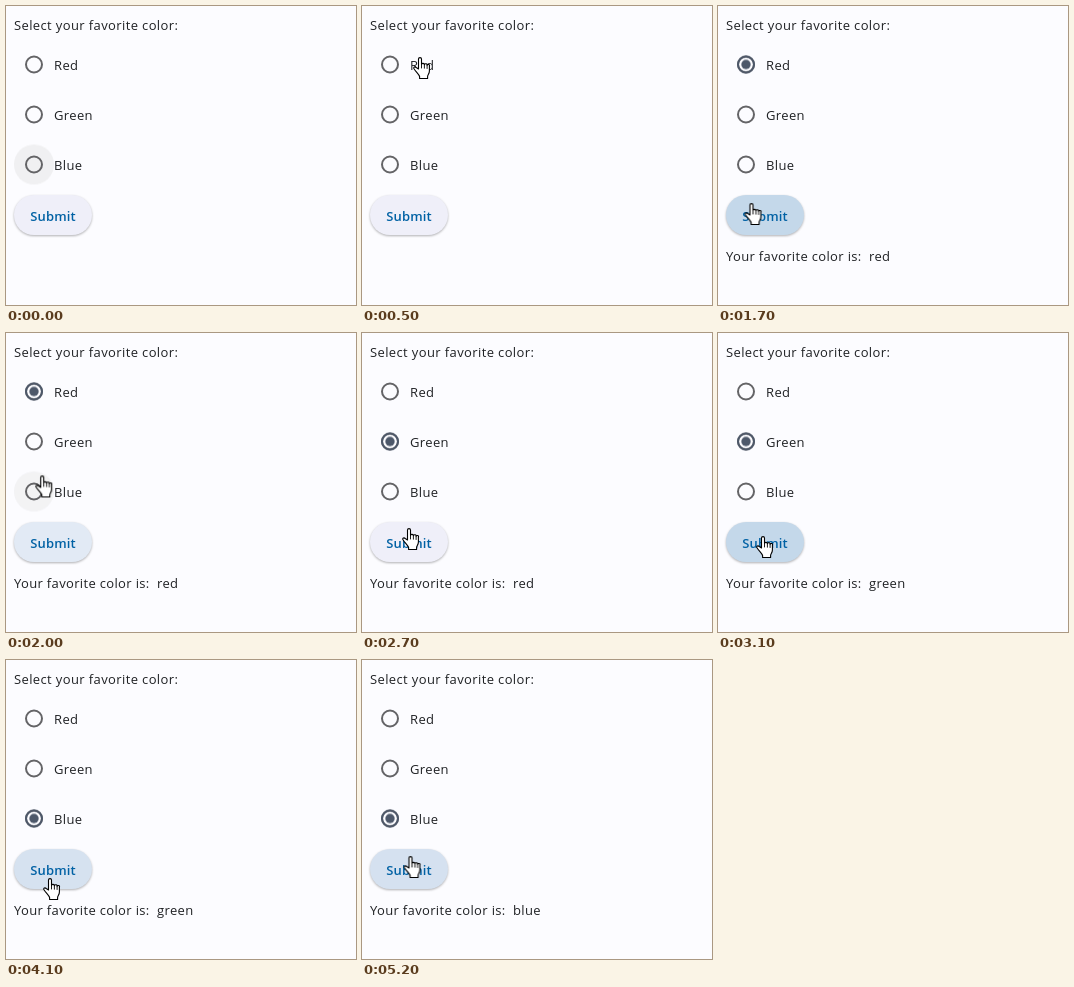
An HTML page for the animation above (5400 ms loop, 350x299 px).

```html
<!DOCTYPE html>
<html lang="en">
<head>
<meta charset="utf-8">
<title>Favorite color</title>
<style>
html, body { margin: 0; width: 100%; height: 100%; overflow: hidden; background: #fcfcff; }
svg { display: block; width: 100%; height: 100%; }
text { font: 13px "Open Sans", "Noto Sans", sans-serif; letter-spacing: .38px; fill: #1f2124; }

.ring { fill: none; stroke: #646467; stroke-width: 2; }
.on .ring { stroke: #4d586a; }
.on .dot { fill: #4d586a; }
.halo { fill: #f0f0f2; }

.face { fill: #efeff9; filter: drop-shadow(0 1px 1.3px rgba(0, 0, 0, .3)); }
.submit { font-weight: 600; letter-spacing: .12px; text-anchor: middle; fill: #0061a4; }
.label { letter-spacing: .34px; }

.hand path { fill: #fff; stroke: #000; stroke-width: 1.1; stroke-linejoin: round; stroke-linecap: round; }
.hand .gaps { fill: none; stroke-width: .9; }
.arrow { fill: #0a0a0a; stroke: #fff; stroke-width: .7; }

/* Everything shares one 5.4 s loop, advancing in 0.1 s ticks. */
.anim { animation: 5.4s step-end infinite; }
.red.on { animation-name: red-on; }
.green.on { animation-name: green-on; }
.blue.on { animation-name: blue-on; }
.green.halo { animation-name: green-halo; }
.blue.halo { animation-name: blue-halo; }
.face { animation-name: face; }
.label { animation-name: label; }
.red.value { animation-name: red-value; }
.green.value { animation-name: green-value; }
.blue.value { animation-name: blue-value; }
.cursor { animation-name: move; }
.hand { animation-name: hand; }
.arrow { animation-name: arrow; }

@keyframes red-on {
  0% { opacity: 0 } 12.96% { opacity: .5 } 14.81% { opacity: 1 }
  44.44% { opacity: .5 } 46.29%, 100% { opacity: 0 }
}
@keyframes green-on {
  0% { opacity: 0 } 44.44% { opacity: .5 } 46.29% { opacity: 1 }
  70.37% { opacity: .5 } 72.22%, 100% { opacity: 0 }
}
@keyframes blue-on {
  0% { opacity: 0 } 70.37% { opacity: .5 } 72.22%, 100% { opacity: 1 }
}
@keyframes green-halo {
  0% { opacity: 0 } 38.88% { opacity: .6 } 40.74% { opacity: 1 }
  46.29% { opacity: .5 } 48.14%, 100% { opacity: 0 }
}
@keyframes blue-halo {
  0% { opacity: 1 } 1.85% { opacity: .5 } 3.7% { opacity: 0 }
  35.18% { opacity: .8 } 38.88% { opacity: 0 }
  48.14% { opacity: .8 } 50% { opacity: 0 }
  62.96% { opacity: 1 } 72.22% { opacity: .5 } 74.07%, 100% { opacity: 0 }
}
@keyframes face {
  0% { fill: #efeff9 }
  16.66% { fill: #e8edf6 } 18.51% { fill: #dfe7f3 } 20.37% { fill: #d8e3f0 }
  31.48% { fill: #c4d8ea } 35.18% { fill: #cfdeed } 37.03% { fill: #e2eaf5 } 38.88% { fill: #efeff9 }
  51.85% { fill: #e0e8f4 } 53.7% { fill: #d8e3f0 }
  55.55% { fill: #c4d8ea } 59.25% { fill: #d0e0f0 } 61.11% { fill: #dce7f4 }
  62.96% { fill: #e8f0fa } 64.81% { fill: #efeff9 }
  74.07% { fill: #e2eaf5 } 75.92% { fill: #d6e2f0 }
  83.33% { fill: #c4d8ea } 87.03% { fill: #cddded } 90.74%, 100% { fill: #d5e1f0 }
}
@keyframes label { 0% { opacity: 0 } 31.48%, 100% { opacity: 1 } }
@keyframes red-value { 0% { opacity: 0 } 31.48% { opacity: 1 } 55.55%, 100% { opacity: 0 } }
@keyframes green-value { 0% { opacity: 0 } 55.55% { opacity: 1 } 83.33%, 100% { opacity: 0 } }
@keyframes blue-value { 0% { opacity: 0 } 83.33%, 100% { opacity: 1 } }

@keyframes move {
  0% { transform: translate(34px, 158px) }
  1.85% { transform: translate(34px, 158px); animation-timing-function: steps(4) }
  9.25% { transform: translate(51px, 51px) }
  12.96% { transform: translate(51px, 51px); animation-timing-function: steps(2) }
  16.66% { transform: translate(25px, 194px); animation-timing-function: steps(3) }
  22.22% { transform: translate(26.5px, 197px) }
  31.48% { transform: translate(26.5px, 197px); animation-timing-function: steps(5) }
  40.74% { transform: translate(31px, 106px) }
  44.44% { transform: translate(31px, 106px); animation-timing-function: steps(3) }
  50% { transform: translate(40px, 195px); animation-timing-function: steps(2) }
  53.7% { transform: translate(38px, 203px) }
  59.25% { transform: translate(38px, 203px); animation-timing-function: steps(2) }
  62.96% { transform: translate(39.5px, 172px); animation-timing-function: steps(2) }
  66.66% { transform: translate(33px, 157.5px) }
  70.37% { transform: translate(33px, 157.5px); animation-timing-function: steps(3) }
  75.92% { transform: translate(37px, 218px) }
  88.88% { transform: translate(37px, 218px); animation-timing-function: steps(2) }
  92.59% { transform: translate(46px, 225px); animation-timing-function: steps(2) }
  96.29%, 100% { transform: translate(41.5px, 196px) }
}
@keyframes hand {
  0% { opacity: 0 } 1.85% { opacity: 1 }
  14.81% { opacity: 0 } 18.51%, 100% { opacity: 1 }
}
@keyframes arrow { 0% { opacity: 0 } 14.81% { opacity: 1 } 18.51%, 100% { opacity: 0 } }
</style>
</head>
<body>
<svg viewBox="0 0 350 299" preserveAspectRatio="none">
  <defs>
    <circle id="ring" class="ring" r="8"/>
    <g id="radio"><circle class="ring" r="8"/></g>
  </defs>

  <text x="8" y="24">Select your favorite color:</text>

  <g transform="translate(28 58.5)">
    <circle class="ring" r="8"/>
    <g class="anim red on"><circle class="ring" r="8"/><circle class="dot" r="4.7"/></g>
  </g>
  <text x="48" y="64">Red</text>

  <g transform="translate(28 108.5)">
    <circle class="anim green halo" r="20"/>
    <circle class="ring" r="8"/>
    <g class="anim green on"><circle class="ring" r="8"/><circle class="dot" r="4.7"/></g>
  </g>
  <text x="48" y="114">Green</text>

  <g transform="translate(28 158.5)">
    <circle class="anim blue halo" r="20"/>
    <circle class="ring" r="8"/>
    <g class="anim blue on"><circle class="ring" r="8"/><circle class="dot" r="4.7"/></g>
  </g>
  <text x="48" y="164">Blue</text>

  <rect class="anim face" x="8" y="189" width="78" height="40" rx="20"/>
  <text class="submit" x="47" y="214.5">Submit</text>

  <text class="anim label" x="8" y="255">Your favorite color is:</text>
  <text class="anim red value" x="151" y="255">red</text>
  <text class="anim green value" x="151" y="255">green</text>
  <text class="anim blue value" x="151" y="255">blue</text>

  <g class="anim cursor">
    <g class="anim hand">
      <path d="M5.5 12V2.1a1.5 1.5 0 0 1 3 0V7.2a1.5 1.3 0 0 1 2.9.4a1.4 1.2 0 0 1 2.7.7a1.2 1.2 0 0 1 2.3.9V14c0 3-1.8 3.8-1.8 5.5v2H6.6v-2C6 17.5 3 15 1 11.8c-.8-1.6 1-2.5 2.2-1.3z"/>
      <path class="gaps" d="M8.5 7v4M11.4 7.7v3.5M14.1 8.5v3"/>
    </g>
    <path class="anim arrow" d="M5 0v15.5l3.5-3.3 2.5 5.8 2.6-1.1-2.5-5.7h4.9z"/>
  </g>
</svg>
</body>
</html>
```
